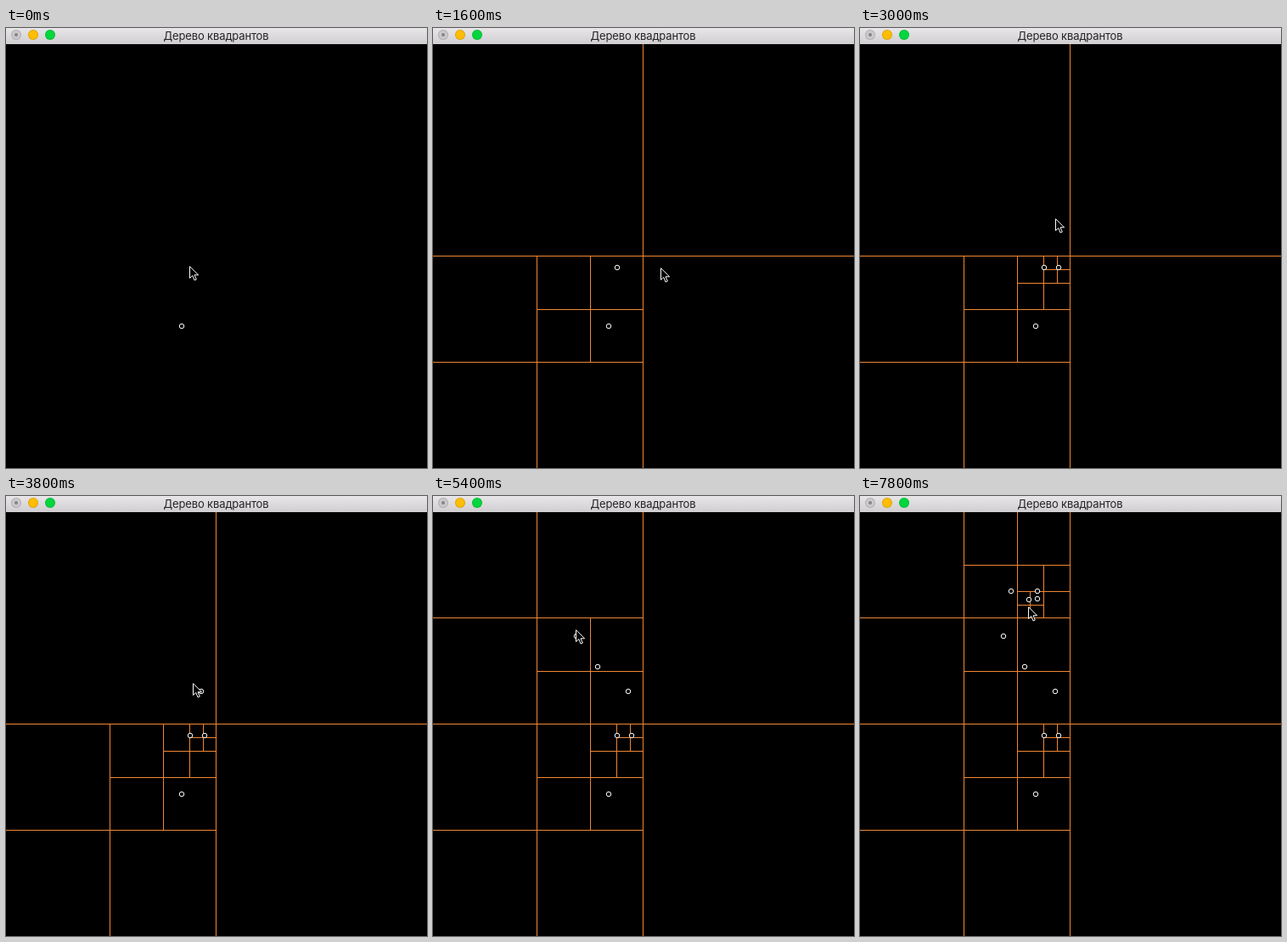
Recreate the animation shown at these times as an HTML page with a canvas. Size 496 by 518 pixels, loop 8 s.

```html
<!DOCTYPE html>
<html lang="ru">
<head>
<meta charset="utf-8">
<title>Дерево квадрантов</title>
<style>
html, body { margin: 0; width: 100%; height: 100%; overflow: hidden; background: #000; }
canvas { position: absolute; left: 0; top: 0; }
header {
  position: absolute; left: 0; top: 0; width: 495px; height: 19px;
  padding-right: 1px; background: linear-gradient(#e8e6e8, #d0ced0);
  font: 13px/18px Inter, Roboto, sans-serif; letter-spacing: -.13px;
  color: #262426; text-align: center; white-space: nowrap;
}
i {
  position: absolute; top: 2px; width: 12px; height: 12px; box-sizing: border-box;
  border: 1px solid #0002; border-radius: 50%;
}
.close { left: 6px; background: radial-gradient(circle, #8a888a 1.6px, #cbc9cb 2.4px); }
.min { left: 26px; background: #ffbd05; }
.max { left: 46px; background: #04d63e; }
</style>
</head>
<body>
<canvas id="stage" width="496" height="518"></canvas>
<header><i class="close"></i><i class="min"></i><i class="max"></i>Дерево квадрантов</header>
<script>
const ctx = document.getElementById('stage').getContext('2d');
const LOOP = 8000, STEP = 100, GLIDE = 300;

// Pointer stops: arrival time, x, y and, where a point is placed, click time
const stops = [
  [0, 207, 351, 0], [0, 217, 282, 700], [1000, 297, 283], [1600, 269, 284],
  [2000, 234, 282, 2500], [3000, 231, 226], [3500, 230, 230, 3700],
  [4000, 194, 201, 4400], [4700, 173, 162], [5200, 169, 165, 5400], [5400, 169, 159],
  [5600, 178, 112, 5900], [6000, 209, 112, 6500], [6800, 209, 121, 6800],
  [7200, 199, 122, 7300], [7600, 199, 132]
].map(([at, x, y, click]) => ({ at, x, y, click }));

const arrow = new Path2D('M.5.7V14.5L3.8 11.5 6.1 17 8.3 16 6 10.8H10.6Z');

// Split a square cell until each leaf holds at most one point
function drawCell(x, y, size, points) {
  if (points.length < 2) return;
  const half = size / 2, mx = x + half, my = y + half;
  const left = Math.floor(x) + 1, top = Math.floor(y);
  ctx.fillStyle = '#f08632';
  ctx.fillRect(Math.floor(mx), top, 1, Math.floor(y + size) - top);
  ctx.fillRect(left, Math.floor(my), Math.floor(x + size) - left, 1);
  for (const right of [false, true])
    for (const low of [false, true])
      drawCell(right ? mx : x, low ? my : y, half,
        points.filter(p => (p.x >= mx) === right && (p.y >= my) === low));
}

function drawPoint({ x, y }) {
  ctx.beginPath();
  ctx.arc(x, y, 2.75, 0, 2 * Math.PI);
  ctx.fillStyle = '#000';
  ctx.fill();
  ctx.strokeStyle = '#fff';
  ctx.stroke();
}

const ease = f => f * f * (3 - 2 * f);

// Glide to each stop in time to arrive, never before leaving the last one
function pointerAt(t) {
  let { x, y, at: last } = stops[0];
  for (const s of stops) {
    const start = Math.max(last, s.at - GLIDE);
    const f = t >= s.at ? 1 : ease(Math.max(0, (t - start) / (s.at - start)));
    x += (s.x - x) * f;
    y += (s.y - y) * f;
    last = s.at;
  }
  return [Math.round(x) - 1, Math.round(y) - 2];
}

function drawPointer(x, y) {
  ctx.save();
  ctx.translate(x, y);
  ctx.fillStyle = '#000';
  ctx.fill(arrow);
  ctx.strokeStyle = '#fff';
  ctx.stroke(arrow);
  ctx.restore();
}

function draw(now) {
  const t = Math.floor((now % LOOP) / STEP) * STEP;
  const points = stops.filter(s => s.click <= t);
  ctx.fillStyle = '#000';
  ctx.fillRect(0, 0, 496, 518);
  drawCell(-2.3, 18.8, 500, points);
  points.forEach(drawPoint);
  drawPointer(...pointerAt(t));
}

const start = performance.now();
function tick() {
  draw(performance.now() - start);
  requestAnimationFrame(tick);
}
tick();
</script>
</body>
</html>
```
